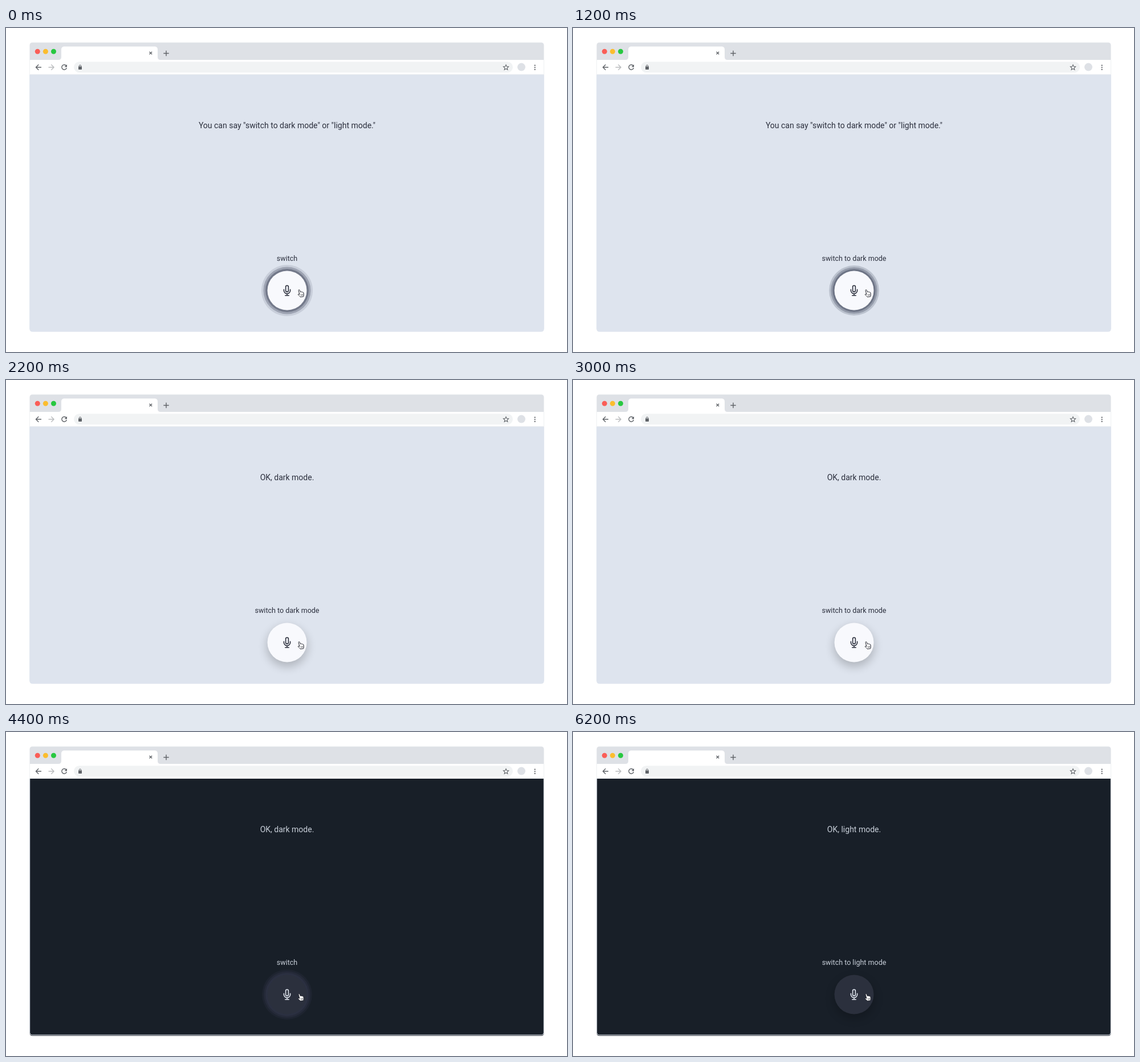
These frames come from a looping animation (984x569 px, 6600 ms). An HTML page:

```html
<!DOCTYPE html>
<html lang="en">
<head>
<meta charset="utf-8">
<title>Voice theme switch</title>
<style>
html, body { margin: 0; width: 100%; height: 100%; overflow: hidden; background: #fff; }
svg {
  display: block; width: 984px; height: 569px;
  --page: #dee4ee; --ink: #2b2f3d; --icon: #2b2f3d; --button: #f8f9fd; --ring: #4a5165; --edge: #dee4ee;
}
svg.dark {
  --page: #181f28; --ink: #c9d0da; --icon: #e1e7f0; --button: #2b303d; --ring: #33364b; --edge: #e4e9f1;
}
text { font-family: Roboto, sans-serif; fill: var(--ink); text-anchor: middle; }
.line { fill: none; stroke: #5f6368; stroke-width: 1.4; }
.page { fill: var(--page); }
.ring { fill: var(--ring); }
.mic { fill: none; stroke: var(--icon); stroke-width: 2; stroke-linecap: round; stroke-linejoin: round; }
</style>
</head>
<body>
<svg id="stage" viewBox="0 0 984 569">
  <defs>
    <filter id="blur" x="-50%" y="-50%" width="200%" height="200%"><feGaussianBlur stdDeviation="8"/></filter>
  </defs>

  <!-- browser window -->
  <path fill="#dee1e6" d="M41.5 82V30.500q0-5 5-5H938.500q5 0 5 5V82z"/>
  <circle cx="55.300" cy="41.300" r="4.500" fill="#fa5e57"/>
  <circle cx="69.400" cy="41.300" r="4.500" fill="#fbbd2e"/>
  <circle cx="83.500" cy="41.300" r="4.500" fill="#28c840"/>
  <path fill="#fff" d="M92 56q5 0 5-5V38q0-5.500 5.500-5.500H260.500q5.500 0 5.500 5.500V51q0 5 5 5H943V81.500H42V56z"/>
  <path class="line" d="M251.500 41.700l4.600 4.600m0-4.600l-4.600 4.600M276.300 44.500h9.400m-4.700-4.700v9.400"/>
  <path class="line" d="M62 69H52.500m4.700-4.700L52.500 69l4.700 4.700"/>
  <path class="line" style="stroke:#babcbe" d="M74.500 69H84m-4.700-4.700L84 69l-4.700 4.700"/>
  <path class="line" d="M105.600 66.300a4.300 4.300 0 1 0 .7 3.700"/>
  <path fill="#5f6368" d="M107 64v4.500h-4.500z"/>
  <rect x="119" y="59.200" width="770" height="19" rx="9.500" fill="#f1f3f4"/>
  <rect x="127" y="67.500" width="6" height="5.400" rx=".7" fill="#5f6368"/>
  <path class="line" style="stroke-width:1" d="M128.300 68v-1.300a1.700 1.700 0 0 1 3.400 0V68"/>
  <path class="line" style="stroke-width:1.100" d="M877 64.600l1.300 3 3.300.3-2.500 2.200.7 3.200-2.800-1.700-2.800 1.700.7-3.200-2.500-2.200 3.300-.3z"/>
  <circle cx="904" cy="68.600" r="7" fill="#dee1e6"/>
  <g fill="#5f6368">
    <circle cx="927.700" cy="65.700" r="1.150"/><circle cx="927.700" cy="69.300" r="1.150"/><circle cx="927.700" cy="72.900" r="1.150"/>
  </g>

  <!-- page -->
  <path class="page" d="M41.500 82H943.500V528.500q0 5-5 5H46.500q-5 0-5-5z"/>
  <path fill="none" style="stroke:var(--edge)" d="M41.700 82V528q0 4 4 4H939.300q4 0 4-4V82"/>
  <text id="prompt" x="493" y="175.500" font-size="14"></text>
  <text id="speech" x="493" y="408.900" font-size="12.500"></text>

  <!-- microphone button -->
  <circle id="shadow" cx="493" cy="468" r="36" fill="#000" opacity=".2" filter="url(#blur)"/>
  <g id="rings">
    <circle class="ring" cx="493" cy="461"/>
    <circle class="ring" cx="493" cy="461" opacity=".34"/>
    <circle class="ring" cx="493" cy="461" opacity=".5"/>
  </g>
  <circle cx="493" cy="461" r="34.500" style="fill:var(--button)"/>
  <path class="mic" transform="translate(483.400 451.400) scale(.8)"
    d="M12 1a3 3 0 0 0-3 3v8a3 3 0 0 0 6 0V4a3 3 0 0 0-3-3zM19 10v2a7 7 0 0 1-14 0v-2M12 19v4M8 23h8"/>
  <path fill="#fff" stroke="#20222b" stroke-width="1" stroke-linejoin="round"
    d="M513.100 461.200c-.5-1.400 1.400-2.100 2-.8l1.400 3.400c.3-.9 1.700-.9 2 .1.400-.7 1.600-.5 1.800.4.600-.5 1.500-.1 1.600.7l.4 3.500c0 1.200-.4 1.800-.6 3.200l-5.600.6c-.6-1.400-2.200-2.300-3.400-3.400-1-.9.1-2.100 1.200-1.500l1.100.8z"/>
  <path fill="none" stroke="#20222b" stroke-width=".6" d="M517.300 467.600l.3 2.700m1.300-2.900l.3 2.700m1.300-2.900l.3 2.700"/>
</svg>
<script>
const LOOP = 6600;
const $ = id => document.getElementById(id);
const stage = $("stage"), rings = [...$("rings").children];

const prompts = [
  [0, 'You can say "switch to dark mode" or "light mode."'],
  [2200, "OK, dark mode."],
  [6200, "OK, light mode."]
];
const speech = [
  [0, "switch"], [500, "switch to"], [900, "switch to dark"], [1200, "switch to dark mode"],
  [1600, "mode"], [2000, "switch to dark mode"],
  [4400, "switch"], [4900, "switch to"], [5100, "to"], [5400, "to light"],
  [5600, "to light mode"], [5800, "mode"], [6100, "switch to light mode"]
];
const current = (track, t) => track.findLast(([start]) => t >= start)[1];

function setText(id, value) {
  if ($(id).textContent !== value) $(id).textContent = value;
}

function draw(t) {
  const listening = t < 2200 || (t >= 3400 && t < 6200);
  stage.classList.toggle("dark", t >= 3200);
  setText("prompt", current(prompts, t));
  setText("speech", current(speech, t));
  $("shadow").style.display = listening ? "none" : "";
  $("rings").style.display = listening ? "" : "none";

  const pulse = Math.cos(t / 700 * 2 * Math.PI);
  const spread = 9.6 + 0.9 * pulse;
  rings.forEach((ring, i) => ring.setAttribute("r", 34.5 + spread * (3 - i) / 3));
  rings[0].setAttribute("opacity", 0.22 - 0.07 * pulse);
}

const begin = performance.now();
function tick() {
  draw((performance.now() - begin) % LOOP);
  requestAnimationFrame(tick);
}
tick();
</script>
</body>
</html>
```
